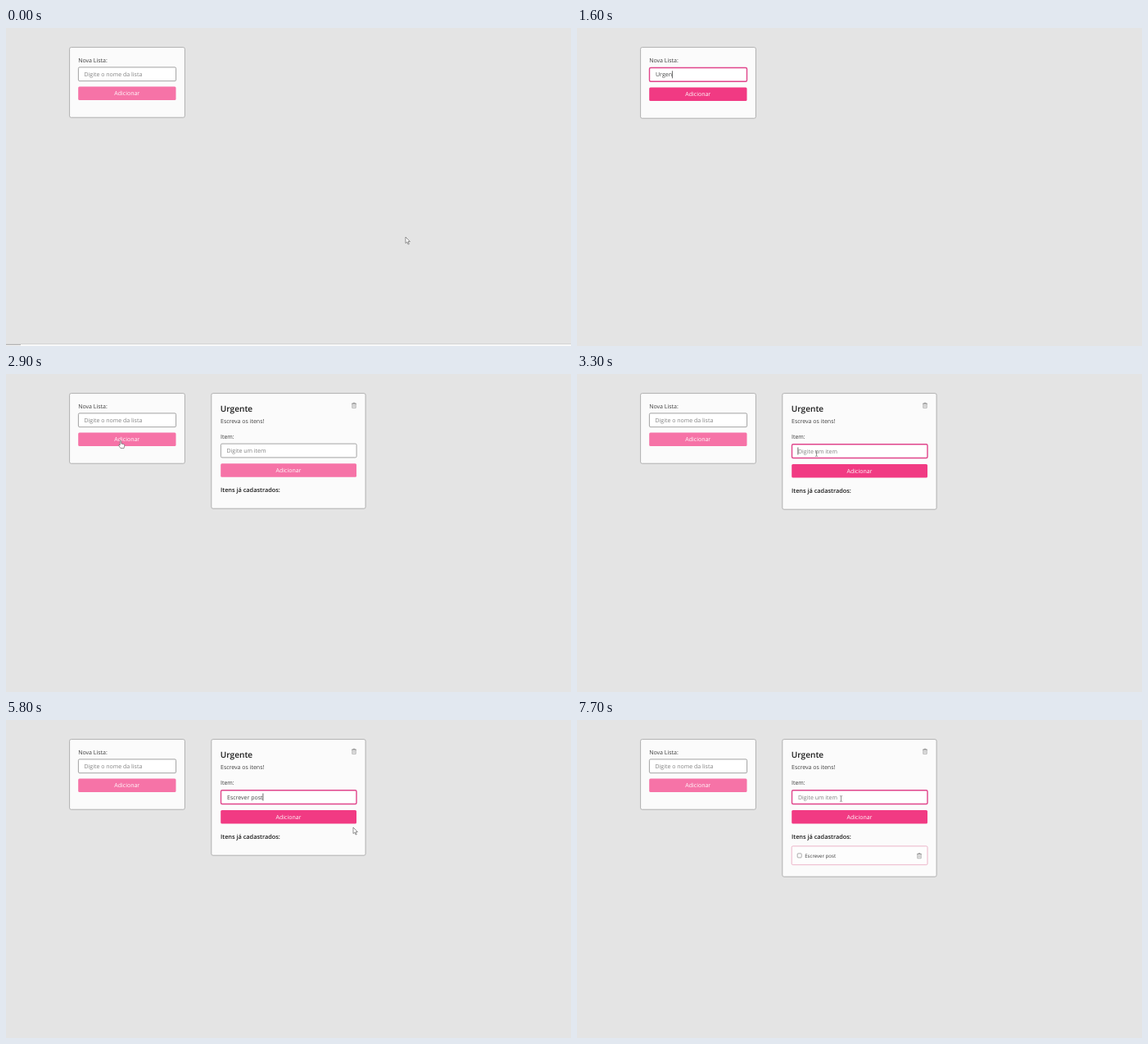
These frames come from a looping animation (690x388 px, 8 s). An HTML page with a canvas:

```html
<!DOCTYPE html>
<html lang="pt-BR">
<head>
<meta charset="utf-8">
<title>Listas</title>
<style>
html, body { margin: 0; width: 100%; height: 100%; overflow: hidden; background: #e4e4e4; }
canvas { display: block; width: 690px; height: 388px; }
</style>
</head>
<body>
<canvas id="stage" width="690" height="388"></canvas>
<script>
const ctx = document.getElementById('stage').getContext('2d');
ctx.textRendering = 'geometricPrecision';
const LOOP = 8000, STEP = 100, BLINK = 350;
const PINK = [241, 58, 131], PALE = [246, 115, 167], BLUE = [24, 139, 220];

const listKeys = [1100, 1300, 1400, 1500, 1600, 1700, 1900];
const itemKeys = [3800, 4000, 4300, 4400, 4500, 4600, 4700, 4800, 5000, 5200, 5300, 5400, 5500];

// Pointer stops: time, shape, x, y
const pointer = [
  [0, 'arrow', 488, 255], [100, 'arrow', 330, 150], [200, 'arrow', 208, 73],
  [500, 'beam', 170, 57], [700, ''],
  [2200, 'beam', 140, 59], [2300, 'hand', 131, 76], [2400, 'hand', 127, 80],
  [2900, 'hand', 140, 81], [3000, 'arrow', 212, 90], [3100, 'beam', 275, 97],
  [3200, 'beam', 292.5, 97], [5700, 'arrow', 372, 128], [5800, 'arrow', 424, 131],
  [6000, 'hand', 350, 119], [6100, 'hand', 330.5, 118], [6400, 'hand', 329, 112],
  [6500, 'beam', 326, 99], [6600, 'beam', 322.5, 96]
];

const within = (t, a, b) => t >= a && t < b;
const rgb = c => `rgb(${c.map(Math.round)})`;
const mix = (a, b, k) => a.map((v, i) => v + (b[i] - v) * Math.min(1, Math.max(0, k)));

function box(x, y, w, h, r, fill, stroke, line = .8) {
  ctx.beginPath();
  ctx.roundRect(x, y, w, h, r);
  if (fill) { ctx.fillStyle = fill; ctx.fill(); }
  if (stroke) { ctx.strokeStyle = stroke; ctx.lineWidth = line; ctx.stroke(); }
}

function text(s, x, y, { size = 7, color = '#3c3c3c', weight = 400, align = 'left' } = {}) {
  ctx.font = `${weight} ${size}px "Open Sans", sans-serif`;
  ctx.textAlign = align;
  ctx.fillStyle = color;
  ctx.fillText(s, x, y);
  return ctx.measureText(s).width;
}

function card(x, w, bottom) {
  box(x, 23.6, w, bottom - 23.6, 2, '#fbfbfb', '#a0a0a0');
}

function field(x, y, w, { value, hint, focus, caret }) {
  if (focus) box(x + .5, y + .7, w - 1, 16.8, 1.5, '#fff', '#e0458b', 1.4);
  else box(x + .4, y + .1, w - .8, 16.8, 1.5, '#fff', '#8c8c8c');
  const tx = x + (focus ? 8 : 7.5), base = y + (focus ? 11.5 : 11);
  const width = text(value || hint, tx, base, { color: value ? '#444' : '#808080' });
  if (focus && caret) {
    ctx.fillStyle = '#444';
    ctx.fillRect(tx + (value ? width : -.5), y + 4.5, .8, 9);
  }
}

function button(x, y, w, color, ring) {
  if (ring) box(x + .5, y + .5, w - 1, 17, 1.5, rgb(color), '#c04fae', 1.2);
  else box(x + .2, y, w - .2, 16.5, 1.5, rgb(color));
  text('Adicionar', x + w / 2, y + (ring ? 11.5 : 10.8), { color: '#fff', align: 'center' });
}

function trash(x, y) {
  ctx.strokeStyle = '#858585';
  ctx.lineWidth = .6;
  ctx.beginPath();
  ctx.moveTo(x - 3, y - 2); ctx.lineTo(x + 3, y - 2);
  ctx.moveTo(x - 1, y - 2); ctx.lineTo(x - 1, y - 3); ctx.lineTo(x + 1, y - 3); ctx.lineTo(x + 1, y - 2);
  ctx.rect(x - 2.2, y - 2, 4.4, 5.2);
  for (const d of [-.9, .9]) { ctx.moveTo(x + d, y - .7); ctx.lineTo(x + d, y + 2); }
  ctx.stroke();
}

const shapes = {
  arrow: new Path2D('M0 0V7.6L1.8 6L3.1 9L4.3 8.5L3 5.6H5.4Z'),
  hand: new Path2D('M-.8.8Q0-.4.8.8V4L3.6 4.6Q4.9 5 4.8 6.3L4 9.6H0L-2.4 6.2Q-2.4 4.8-.8 5.8Z'),
  beam: new Path2D('M-1.4-3.4Q0-3.4 0-2.6Q0-3.4 1.4-3.4M0-2.6V2.6M-1.4 3.4Q0 3.4 0 2.6Q0 3.4 1.4 3.4')
};

function drawPointer(t) {
  const [, kind, x, y] = pointer.findLast(p => p[0] <= t);
  if (!kind) return;
  ctx.save();
  ctx.translate(x, y);
  ctx.lineWidth = .7;
  ctx.strokeStyle = '#666';
  ctx.fillStyle = '#fff';
  if (kind !== 'beam') ctx.fill(shapes[kind]);
  ctx.stroke(shapes[kind]);
  ctx.restore();
}

// Typed value and caret state for a field focused at the given time
function entry(t, word, keys, focusAt) {
  const n = keys.filter(k => k <= t).length;
  const last = n ? keys[n - 1] : focusAt;
  return { value: word.slice(0, n), caret: Math.floor((t - last) / BLINK) % 2 === 0 };
}

function listCard(t) {
  const focus = within(t, 500, 2500), ring = within(t, 2500, 2700);
  const shift = focus ? 1 : 0;
  const typing = t < 2700 ? entry(t, 'Urgente', listKeys, 500) : { value: '' };
  let color = PALE;
  if (within(t, 500, 2300)) color = PINK;
  else if (within(t, 2300, 2700)) color = BLUE;
  else if (t >= 2700) color = mix(BLUE, PALE, (t - 2600) / 200);
  card(77.6, 140.8, 109.2 + shift + (ring ? 1.5 : 0));
  text('Nova Lista:', 88.2, 41.8);
  field(88, 47.8, 120, { ...typing, hint: 'Digite o nome da lista', focus });
  button(88, 71.5 + shift, 119.5, color, ring);
}

function itemCard(t) {
  const again = t >= 6600, added = t >= 6200;
  const focus = within(t, 3300, 6100) || again, ring = within(t, 6100, 6200);
  const shift = focus || ring ? 1 : 0;
  const typing = added ? entry(t, '', [], 6600) : entry(t, 'Escrever post', itemKeys, 3300);
  let color = PALE;
  if (within(t, 6000, 6200)) color = BLUE;
  else if (focus) color = PINK;
  else if (added) color = mix(BLUE, PALE, (t - 6100) / 200);
  card(250.8, 188.3, (added ? 190.2 : 164.2) + shift);
  text('Urgente', 261.8, 45.8, { size: 10.1, weight: 600, color: '#1c1c1c' });
  trash(425, 38.2);
  text('Escreva os itens!', 262, 59.6);
  text('Item:', 262, 79.3);
  field(262, 85, 166.5, { ...typing, hint: 'Digite um item', focus });
  button(262, 109.3 + (focus ? .7 : 0), 166, color, ring);
  text('Itens já cadastrados:', 262, 144.1 + shift * .8, { size: 7.35, weight: 600, color: '#1c1c1c' });
  if (!added) return;
  const y = 153 + shift * .9;
  box(262.2, y, 165.8, 22.8, 1.5, '#fdfdfd', '#e8a3bb');
  box(269.2, y + 9, 5, 5, .8, '#fff', '#888', .7);
  text('Escrever post', 278.2, y + 13.8, { size: 6.1 });
  trash(418, y + 11.7);
}

function draw(t) {
  ctx.fillStyle = '#e4e4e4';
  ctx.fillRect(0, 0, 690, 388);
  if (t < 500) {
    ctx.fillStyle = '#d4d4d4';
    ctx.fillRect(0, 385, 690, 1);
    ctx.fillStyle = '#f8f8f8';
    ctx.fillRect(0, 386, 690, 2);
    ctx.fillStyle = '#b4b4b4';
    ctx.fillRect(0, 386, 18, 1);
  }
  listCard(t);
  if (t >= 2700) itemCard(t);
  drawPointer(t);
}

const start = performance.now();
function tick() {
  const t = (performance.now() - start) % LOOP;
  draw(Math.floor(t / STEP) * STEP);
  requestAnimationFrame(tick);
}
tick();
</script>
</body>
</html>
```
